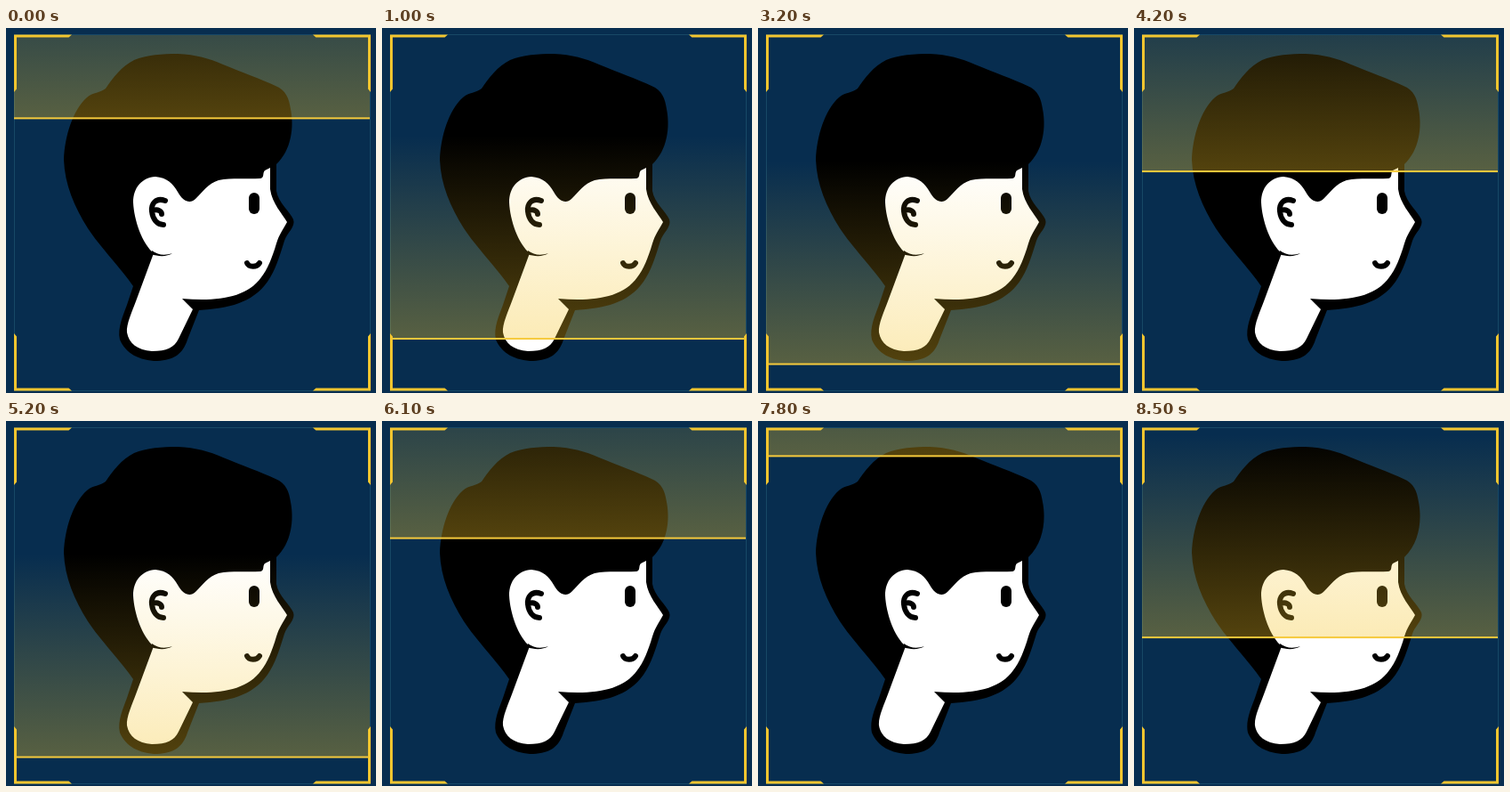
An HTML page that plays this animation: 416 by 410 pixels, repeating every 8600 ms.

```html
<!DOCTYPE html>
<html lang="en">
<head>
<meta charset="utf-8">
<title>Face scan</title>
<style>
  html, body { margin: 0; width: 100%; height: 100%; overflow: hidden; background: #072d4f; }
  svg { display: block; }
</style>
</head>
<body>
<svg width="416" height="410" viewBox="0 0 416 410">
  <defs>
    <linearGradient id="beam" x1="0" y1="0" x2="0" y2="1">
      <stop offset=".43" stop-color="#f5c428" stop-opacity="0"/>
      <stop offset="1" stop-color="#f5c428" stop-opacity=".34"/>
    </linearGradient>
    <path id="corner" d="M9 7.5H74L70.5 10.5H12V68.5L9 72Z" fill="#f3c52f"/>
  </defs>

  <rect width="416" height="410" fill="#072d4f"/>
  <rect x="9.5" y="7.5" width="400" height="400" fill="none" stroke="#174866"/>

  <!-- hair and outline -->
  <path d="M143 290C131 272 105 245 92 225C77 201 66 176 65 148C66 122 75 92 91 78
    C98 72 106 73 112 68C120 56 130 43 144 36C158 30 176 29 193 29C214 30 228 34 244 41
    C266 50 286 57 303 65C315 70 318 79 320 91C324 111 321 137 304 153L304 183
    C306 196 319 206 323 215C326 223 316 230 313 239C307 258 303 272 294 285
    C277 309 250 315 217 317L204 350C199 366 189 373 170 374C150 374 134 365 128 350
    C125 337 132 322 136 311Z"/>
  <!-- face, ear and neck -->
  <path d="M166 253C153 242 144 216 143 196C143 179 153 168 168 167C181 168 188 175 193 184
    C199 195 207 198 213 192C221 184 227 175 239 171C254 168 271 170 286 169
    C291 168 288 163 291 160L297 157L297 181C299 197 311 209 316 218
    C311 227 307 232 304 242C299 259 294 271 287 280C270 304 236 307 198 304L210 316
    L194 349C189 359 181 363 164 363C148 362 138 354 136 342C135 333 142 318 146 307Z" fill="#fff"/>
  <path d="M164 250C171 255 178 256 187 253C181 257 172 257 163 254Z"/>

  <g fill="none" stroke="#000" stroke-width="6" stroke-linecap="round">
    <path d="M179 194C168 190 163 198 164 206C165 215 170 221 177 221M165 205C171 203 175 206 175 209"/>
    <path d="M271 264C273 269 282 269 285 264"/>
    <path d="M279 191V203" stroke-width="12"/>
  </g>

  <svg x="9" y="8" width="400" height="400">
    <g id="scan">
      <rect y="-400" width="400" height="400" fill="url(#beam)"/>
      <rect y="-1" width="400" height="2" fill="#f6ca3c"/>
    </g>
  </svg>

  <use href="#corner"/>
  <use href="#corner" transform="matrix(-1 0 0 1 419 0)"/>
  <use href="#corner" transform="matrix(1 0 0 -1 0 415)"/>
  <use href="#corner" transform="matrix(-1 0 0 -1 419 415)"/>
</svg>
<script>
  const LOOP = 8600, STEP = 100, SWEEP = 2000, LEAD = 300, HEIGHT = 400;
  const scan = document.getElementById('scan');
  const start = performance.now();

  function draw() {
    const elapsed = (performance.now() - start) % LOOP;
    const time = Math.floor(elapsed / STEP) * STEP;
    const progress = (time + LEAD) % SWEEP / SWEEP;
    const y = HEIGHT * Math.sin(progress * Math.PI / 2);
    scan.setAttribute('transform', `translate(0 ${y.toFixed(2)})`);
    requestAnimationFrame(draw);
  }
  draw();
</script>
</body>
</html>
```
